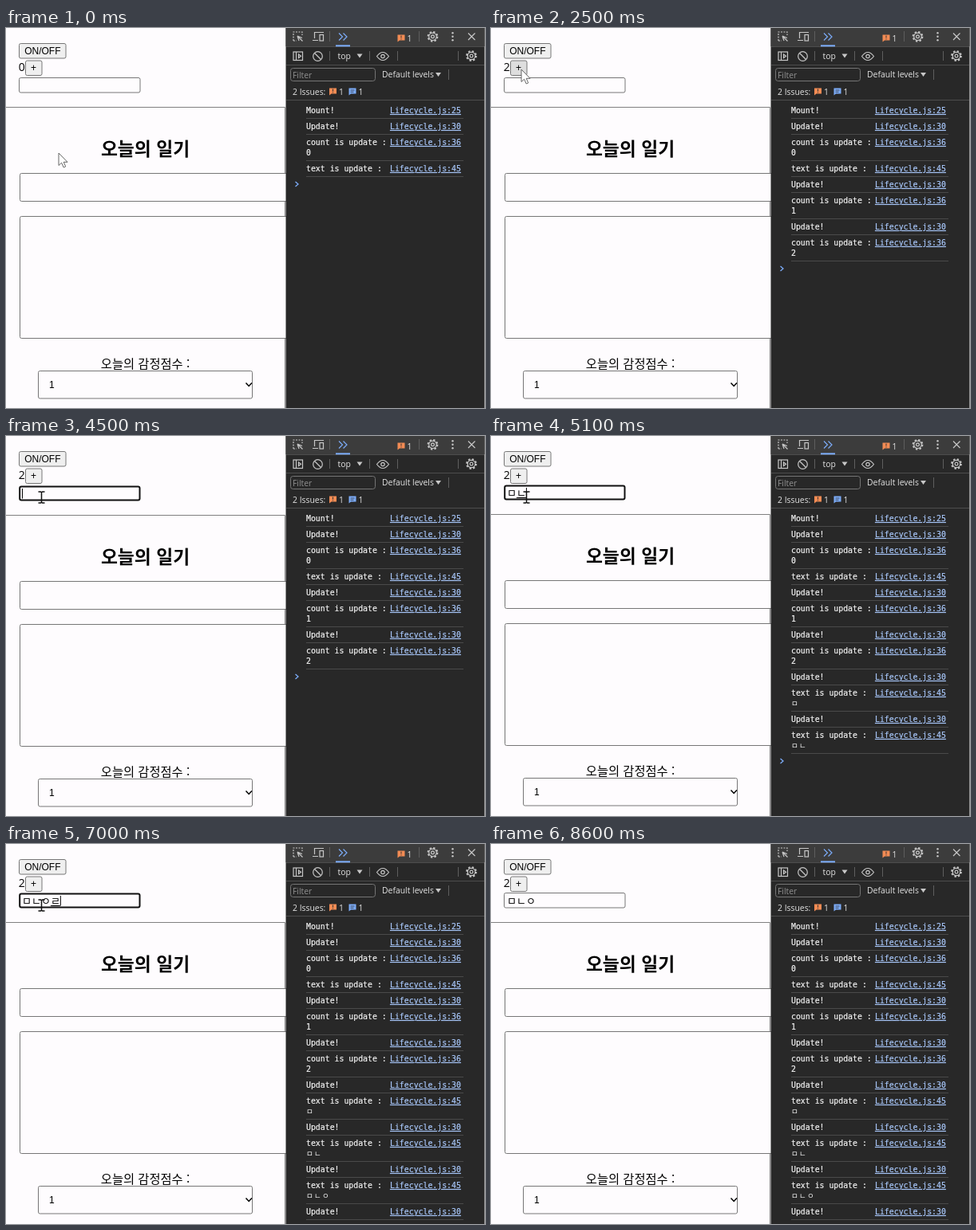
Recreate the animation shown at these times as an HTML page. Size 600 by 477 pixels, loop 8700 ms.

```html
<!DOCTYPE html>
<html lang="ko">
<head>
<meta charset="utf-8">
<title>Lifecycle console</title>
<style>
  html, body { margin: 0; width: 100%; height: 100%; overflow: hidden; background: #fefcfe; }
  svg { display: block; width: 100%; height: 100%; }
  text { white-space: pre; }
  .ko { font-family: "Noto Sans CJK KR", "Noto Sans CJK", sans-serif; }
  .control { font: 12px "Liberation Sans", sans-serif; }
  .ui { font: 10.4px "Open Sans", sans-serif; fill: #e3e3e3; }
  .log { font: 9.85px "DejaVu Sans Mono", "Noto Sans CJK KR", "Noto Sans CJK", monospace; fill: #f4f4f4; }
  .log text { stroke: #f4f4f4; stroke-width: .2; }
  .log .link { fill: #a8c7fa; stroke: #a8c7fa; text-decoration: underline; }
  .log .jamo { font-size: 9.5px; letter-spacing: 1.2px; stroke: none; }
  .field { fill: #fefcfe; stroke: #767676; }
  .button { fill: #efefef; stroke: #767676; }
  .icon { fill: none; stroke: #c7c7c7; stroke-width: 1.2; }
  .rule { stroke: #5e5e5e; }
</style>
</head>
<body>
<svg viewBox="0 0 600 477" preserveAspectRatio="none">
  <defs>
    <g id="gear" class="icon">
      <circle r="5.9" stroke-width="2" stroke-dasharray="2.32 2.315"/>
      <circle r="4.700"/><circle r="1.900"/>
    </g>
    <g id="issue">
      <path d="M0 0h9v7h-6.500l-2.500 2z"/>
    </g>
  </defs>

  <rect width="600" height="477" fill="#fefcfe"/>
  <rect class="button" x="16.500" y="19.500" width="58.500" height="18.500" rx="2"/>
  <text class="control" x="23.200" y="33">ON/OFF</text>
  <text id="count" x="15.800" y="54.300" font-family="Open Sans, sans-serif" font-size="14"></text>
  <rect class="button" id="plus" x="24.500" y="41" width="20.500" height="18.500" rx="2"/>
  <text class="control" x="31" y="54.300">+</text>

  <g id="page">
    <rect class="field" id="input" x="16.500" y="62.500" width="151.500" height="18.500" rx="2"/>
    <rect id="focus" x="17.200" y="63.500" width="150.300" height="17" rx="2" fill="#fefcfe" stroke="#101010" stroke-width="2"/>
    <text class="ko" id="typed" x="20" y="76.500" font-size="13"></text>
    <path id="underline" stroke="#000"/>
    <path id="caret" stroke="#000"/>
    <path d="M0 99.500H349.500V480" fill="none" stroke="#808080"/>
    <text class="ko" x="174.500" y="159.800" font-size="22.800" font-weight="700" text-anchor="middle">오늘의 일기</text>
    <rect class="field" x="17.500" y="182.500" width="350" height="35" rx="2"/>
    <rect class="field" x="17.500" y="236.500" width="350" height="153" rx="2"/>
    <text class="ko" x="174.500" y="426.800" font-size="15.300" text-anchor="middle">오늘의 감정점수 :</text>
    <rect class="field" x="40.500" y="430.500" width="268" height="34.500" rx="2"/>
    <text class="control" x="54" y="452">1</text>
    <path d="M300.500 445.500l3.700 4 3.700-4" fill="none" stroke="#000" stroke-width="1.500"/>
  </g>

  <rect x="350.500" width="249" height="477" fill="#282828"/>
  <rect x="350.500" width="249" height="23" fill="#3c3c3c"/>
  <path class="rule" d="M351 23.500H599M351 46.500H599M351 90.500H599" opacity=".7"/>
  <path class="rule" d="M405.500 4V17M517.500 4V17M405.500 29V41M455.500 29V41M490.500 29V41M566.500 29V41M554.500 52V65"/>

  <g class="icon">
    <path d="M360 16V5H371V9" stroke-dasharray="2 1.500"/>
    <path d="M360 16h4" stroke-dasharray="2 1.500"/>
    <path d="M365 10l2 6M365 10l6 2.500M365 10l6.500 6.500"/>
    <path d="M386.500 13V5.500H398M384 15.500h7"/>
    <rect x="393" y="8.500" width="4.500" height="7.500"/>
    <path d="M417 6.500l4.500 4.500-4.500 4.500M422.500 6.500l4.500 4.500-4.500 4.500" stroke="#7cacf8"/>
    <path d="M413 22.300h18" stroke="#7cacf8" stroke-width="2"/>
    <path d="M579 6.500l8.500 8.500M587.500 6.500l-8.500 8.500"/>
    <rect x="360" y="30" width="11.500" height="10.500"/>
    <path d="M363.500 30v10.500M366.500 33l3 2.300-3 2.300z"/>
    <circle cx="390.500" cy="35.500" r="5.800"/><path d="M386.500 31.500l8 8"/>
    <path d="M464.500 35.500q7.500-10 15 0q-7.500 10-15 0z"/>
    <circle cx="472" cy="35.500" r="2.200"/>
    <rect x="356.500" y="50.500" width="106" height="16" rx="3" stroke="#757575" stroke-width="1"/>
  </g>
  <g fill="#c7c7c7">
    <circle cx="559.500" cy="6.300" r="1.200"/><circle cx="559.500" cy="10.800" r="1.200"/><circle cx="559.500" cy="15.300" r="1.200"/>
    <path d="M439.500 32.500h7l-3.500 5zM538 56h7l-3.500 5z"/>
  </g>
  <use href="#gear" x="534.500" y="10.800"/>
  <use href="#gear" x="583" y="35"/>
  <use href="#issue" x="490.500" y="8.500" fill="#f28b54"/>
  <use href="#issue" x="405" y="75.500" fill="#f28b54"/>
  <use href="#issue" x="429.500" y="75.500" fill="#7cacf8"/>
  <path d="M495 9.500v3M495 13.500v1M409.500 76.500v3M409.500 80.500v1" stroke="#333"/>
  <path d="M431.500 78h5M431.500 80.300h4" stroke="#333" stroke-width=".8"/>
  <g class="ui">
    <text x="502.500" y="16.500">1</text>
    <text x="415.500" y="39">top</text>
    <text x="359" y="62.500" fill="#8f8f8f">Filter</text>
    <text x="471" y="62.300">Default levels</text>
    <text x="359" y="84">2 Issues:</text>
    <text x="417" y="84">1</text>
    <text x="441.500" y="84">1</text>
  </g>
  <g id="logs" class="log"></g>
  <path id="prompt" d="M362.500-3l3.500 3-3.500 3" fill="none" stroke="#7cacf8" stroke-width="1.300"/>

  <path id="arrow" d="M0 0V15.500L3.600 12.200L6.200 18L8.700 16.900L6.200 11.300H11Z" fill="#fff" stroke="#555" stroke-width=".9"/>
  <path id="beam" d="M-4-7h3l1 1 1-1h3M0-6V6M-4 7h3l1-1 1 1h3" fill="none" stroke="#111" stroke-width="1.500"/>
</svg>
<script>
const LOOP = 8700, STEP = 100;
const MOUNT = ["Mount!", 25], UPDATE = ["Update!", 30];
const count = n => ["count is update :", 36, n];
const typed = s => ["text is update :", 45, s];

// Each step: time, count, input text, console messages
const steps = [
  [0, 0, "", [MOUNT, UPDATE, count("0"), typed("")]],
  [1400, 1, "", [UPDATE, count("1")]],
  [2100, 2, "", [UPDATE, count("2")]],
  [4700, 2, "ㅁ", [UPDATE, typed("ㅁ")]],
  [5000, 2, "ㅁㄴ", [UPDATE, typed("ㅁㄴ")]],
  [5800, 2, "ㅁㄴㅇ", [UPDATE, typed("ㅁㄴㅇ")]],
  [6700, 2, "ㅁㄴㅇㄹ", [UPDATE, typed("ㅁㄴㅇㄹ")]],
  [8200, 2, "ㅁㄴㅇ", []]
];
// Pointer positions: time, x, y
const pointer = [
  [0, 66, 157], [200, 66, 157], [800, 47.5, 56], [900, 47.5, 56],
  [1200, 38, 52], [2700, 38, 52], [3200, 44.5, 77], [LOOP, 44.5, 77]
];
const BEAM_ON = 3100, FOCUS = 3400, SHIFT = 4700, BLUR = 8200, JAMO = 11.96;

const $ = id => document.getElementById(id);
const show = (id, on) => $(id).setAttribute("visibility", on ? "visible" : "hidden");
const moveTo = (id, x, y) => $(id).setAttribute("transform", `translate(${x} ${y})`);

const groups = [];
let bottom = 93;
for (const [time, , , messages] of steps) {
  let html = "";
  for (const [message, line, extra] of messages) {
    const top = bottom;
    bottom += extra ? 33 : 20;
    html += `<text x="376" y="${top + 14}">${message}</text>
      <text class="link" x="481" y="${top + 14}">Lifecycle.js:${line}</text>
      <path d="M376 ${bottom + .5}H573" stroke="#4a4a4a"/>`;
    if (extra) html += `<text class="${extra > "ㄱ" ? "jamo" : ""}" x="376" y="${top + 27}">${extra}</text>`;
  }
  const group = document.createElementNS("http://www.w3.org/2000/svg", "g");
  group.innerHTML = html;
  $("logs").append(group);
  groups.push({ time, group, bottom });
}

function pointerAt(t) {
  const i = Math.max(1, pointer.findIndex(p => p[0] > t));
  const [t0, x0, y0] = pointer[i - 1], [t1, x1, y1] = pointer[i];
  const u = (t - t0) / (t1 - t0), k = u * u * (3 - 2 * u);
  return [x0 + (x1 - x0) * k, y0 + (y1 - y0) * k];
}

function draw(t) {
  const [since, number, text] = steps.findLast(s => s[0] <= t);
  const focused = t >= FOCUS && t < BLUR;
  const end = 20 + text.length * JAMO;

  $("count").textContent = number;
  $("typed").textContent = text;
  show("input", !focused);
  show("focus", focused);
  $("underline").setAttribute("d", `M${end - JAMO} 78.500H${end}`);
  show("underline", focused && text);
  // Every keystroke restarts the caret blink
  $("caret").setAttribute("d", `M${end + .5} 66V78.500`);
  show("caret", focused && (t - Math.max(since, FOCUS)) % 1000 < 500);
  moveTo("page", 0, t >= SHIFT ? -1 : 0);
  $("plus").style.fill = t >= 1100 && t < 2900 ? "#dedede" : "#efefef";

  let promptY = 0;
  for (const { time, group, bottom } of groups) {
    group.setAttribute("visibility", t >= time ? "visible" : "hidden");
    if (t >= time) promptY = bottom + 10;
  }
  moveTo("prompt", 0, promptY);

  const [x, y] = pointerAt(t);
  moveTo("arrow", x, y);
  moveTo("beam", x, y);
  show("arrow", t < BEAM_ON);
  show("beam", t >= BEAM_ON && t < 7900);
}

const start = performance.now();
function tick(now) {
  const t = Math.max(0, now - start) % LOOP;
  draw(Math.floor(t / STEP) * STEP);
  requestAnimationFrame(tick);
}
draw(0);
requestAnimationFrame(tick);
</script>
</body>
</html>
```
